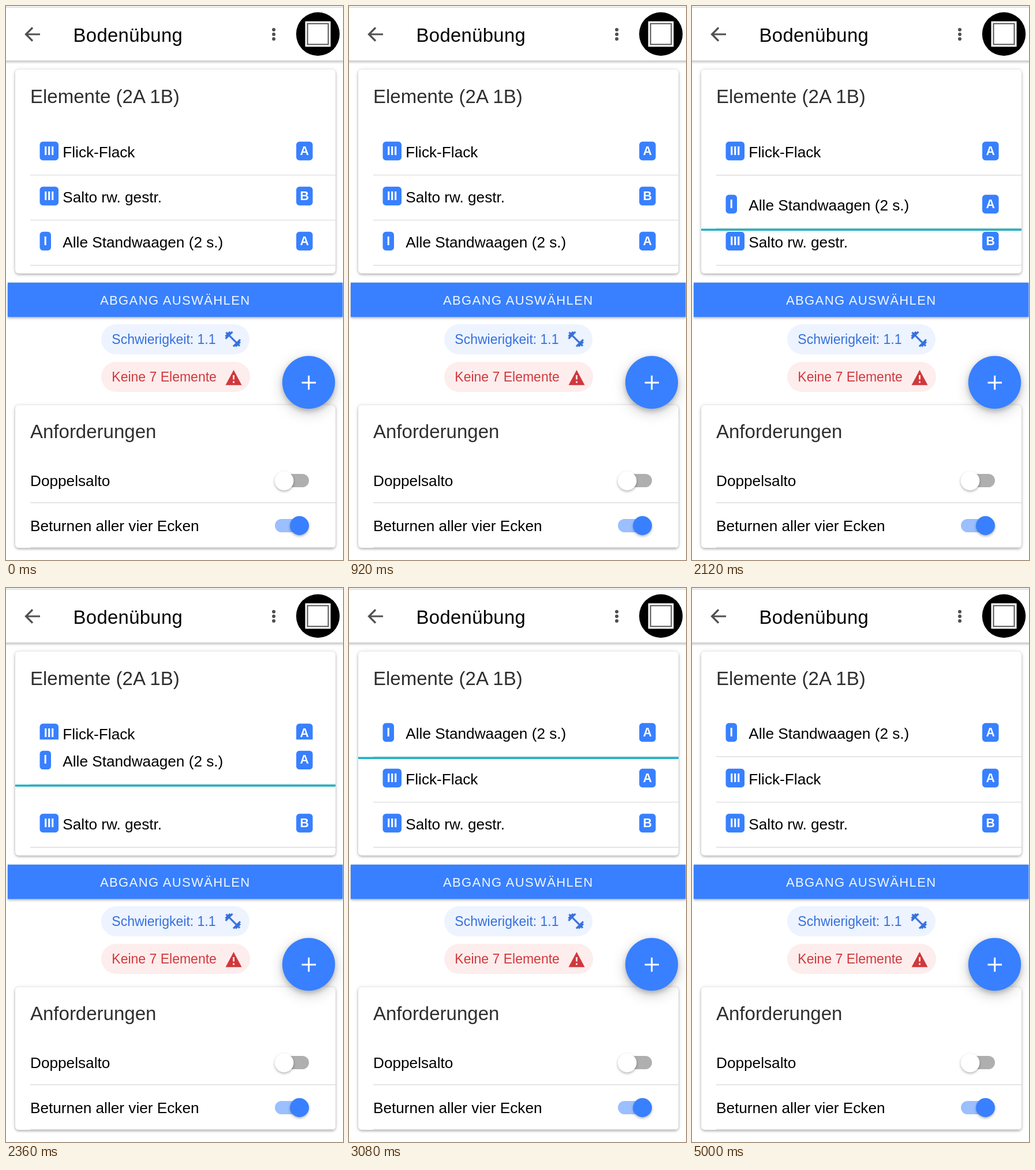
Write an HTML page that moves like this. It is 584 px wide and 959 px high and loops after 5.04 s.

```html
<!DOCTYPE html>
<html lang="de">
<head>
<meta charset="utf-8">
<title>Bodenübung</title>
<style>
  html, body { margin: 0; width: 100%; height: 100%; overflow: hidden; background: #fff; }
  svg { display: block; width: 584px; height: 959px; font: 26.2px "Liberation Sans", Arial, sans-serif; }
  .head { font-size: 33px; fill: #2e2e2e; }
  .small { font-size: 23px; }
  .badge { font-size: 21.3px; font-weight: bold; fill: #fff; text-anchor: middle; }
  .card { fill: #fff; filter: drop-shadow(0 2px 2px rgba(0,0,0,.26)) drop-shadow(0 0 3px rgba(0,0,0,.12)); }
  .lift { filter: drop-shadow(0 4px 4px rgba(0,0,0,.2)) drop-shadow(0 6px 11px rgba(0,0,0,.2)); }
  .knob { filter: drop-shadow(0 2px 2px rgba(0,0,0,.3)); }
  .line { fill: #dfdfdf; }
  .blue { fill: #3880ff; }
</style>
</head>
<body>
<svg viewBox="0 0 584 959">
  <defs>
    <linearGradient id="shade" x2="0" y2="1">
      <stop offset="0" stop-color="#bdbdbd"/>
      <stop offset=".4" stop-color="#dedede"/>
      <stop offset="1" stop-color="#fff"/>
    </linearGradient>
  </defs>

  <!-- header -->
  <rect y="1" width="584" height="2" fill="#e2e2e2"/>
  <rect y="94.5" width="584" height="6" fill="url(#shade)"/>
  <path d="M59 49H35M46 37.5L34.5 49L46 60.5" fill="none" stroke="#505050" stroke-width="3.2"/>
  <text x="116.6" y="62" font-size="32.8" letter-spacing=".35">Bodenübung</text>
  <g fill="#505050">
    <circle cx="464" cy="41" r="3"/><circle cx="464" cy="49" r="3"/><circle cx="464" cy="57" r="3"/>
  </g>
  <circle cx="540.5" cy="48.5" r="37.7"/>
  <rect x="518.5" y="26.5" width="44" height="44" fill="#fff"/>
  <rect x="522.5" y="30.5" width="36" height="36" fill="none" stroke="#555" stroke-width="2"/>

  <!-- element list -->
  <rect class="card" x="16" y="110" width="555" height="353" rx="6"/>
  <text class="head" x="42" y="168">Elemente (2A 1B)</text>
  <g id="list"></g>

  <!-- button and chips -->
  <rect class="blue knob" x="3" y="478.8" width="580.4" height="59.5"/>
  <text x="163" y="517" font-size="22" letter-spacing="1.38" fill="#f4f8ff">ABGANG AUSWÄHLEN</text>
  <rect x="165" y="551" width="257" height="52" rx="26" fill="#edf3ff"/>
  <g fill="#3570dc">
    <text class="small" x="183.3" y="585">Schwierigkeit: 1.1</text>
    <path transform="translate(377 560.5) scale(1.35)" stroke="#3570dc" stroke-width=".5" d="M20.6 14.9L22 13.4 20.6 12 17 15.6 8.4 7 12 3.4 10.6 2 9.1 3.4 7.7 2 5.6 4.1 4.1 2.7 2.7 4.1 4.1 5.6 2 7.7 3.4 9.1 2 10.6 3.4 12 7 8.4 15.6 17 12 20.6 13.4 22 14.9 20.6 16.3 22 18.4 19.9 19.9 21.3 21.3 19.9 19.9 18.4 22 16.3z"/>
  </g>
  <rect x="165" y="616" width="258" height="52" rx="26" fill="#fdeded"/>
  <g fill="#d0383c">
    <text class="small" x="183.3" y="650">Keine 7 Elemente</text>
    <path d="M380.5 656.3L394.5 630L408.5 656.3z"/>
  </g>
  <path d="M394.5 639v7.5M394.5 649.5v3" stroke="#fdeded" stroke-width="2.8"/>

  <!-- requirements -->
  <rect class="card" x="16" y="691" width="555" height="247" rx="6"/>
  <text class="head" x="42" y="748">Anforderungen</text>
  <text x="42" y="831">Doppelsalto</text>
  <rect class="line" x="42" y="859" width="529" height="1.6"/>
  <text x="42" y="909">Beturnen aller vier Ecken</text>
  <rect class="line" x="42" y="936.5" width="529" height="1.5"/>
  <rect x="466" y="810" width="59" height="23" rx="11.5" fill="#afafaf"/>
  <circle class="knob" cx="482" cy="822" r="16.4" fill="#fff"/>
  <rect x="466" y="888" width="59" height="23" rx="11.5" fill="#9bbfff"/>
  <circle class="blue knob" cx="508.5" cy="899.5" r="16.4"/>

  <!-- floating button -->
  <circle class="blue lift" cx="524.5" cy="651.5" r="45.7"/>
  <path d="M512.5 652h24.5M524.7 639.8v24.5" stroke="#fff" stroke-width="3"/>
</svg>
<script>
const LOOP = 5040, STEP = 40, PITCH = 78;
const list = document.getElementById('list');

const badge = (x, w, label) =>
  `<rect class="blue" x="${x}" y="234.8" width="${w}" height="32.4" rx="5.5"/>
   <text class="badge" x="${x + w / 2}" y="257.5">${label}</text>`;

const rows = [
  ['III', 'Flick-Flack', 'A'],
  ['III', 'Salto rw. gestr.', 'B'],
  ['I', 'Alle Standwaagen (2 s.)', 'A'],
].map(([group, name, value]) => {
  const g = document.createElementNS('http://www.w3.org/2000/svg', 'g');
  g.innerHTML =
    `<rect x="16" y="215.5" width="555" height="78" fill="#fff"/>
     <rect class="line" x="42" y="292" width="529" height="1.6"/>
     ${badge(58.5, group === 'I' ? 19.5 : 32.5, group)}
     <text x="98.3" y="262">${name}</text>
     ${badge(503, 28.5, value)}`;
  return list.appendChild(g);
});
rows[2].insertAdjacentHTML('beforeend',
  '<rect x="16" y="293.5" width="555" height="3.5" fill="#17b2c5"/>');
const marker = rows[2].lastElementChild;

// [time, offset] pairs, linear in between
const drag = [[1760, 0], [1800, -10], [1960, -43], [2120, -64], [2320, -98],
  [2560, -165], [2720, -170], [2880, -170], [3040, -157]];
const MARK_ON = 1800, MARK_OFF = 3240;

function track(keys, t) {
  const i = keys.findIndex(k => k[0] > t);
  if (i === 0) return keys[0][1];
  if (i < 0) return keys[keys.length - 1][1];
  const [t0, a] = keys[i - 1], [t1, b] = keys[i];
  return a + (b - a) * (t - t0) / (t1 - t0);
}

function slide(t, start, length) {
  const p = Math.min(1, Math.max(0, (t - start) / length));
  return PITCH * (1 - (1 - p) ** 3);
}

function draw() {
  const t = Math.floor(performance.now() % LOOP / STEP) * STEP;
  const y = [
    slide(t, 2360, 200),
    PITCH + slide(t, 1900, 200),
    2 * PITCH + track(drag, t),
  ];
  rows.forEach((row, i) => row.setAttribute('transform', `translate(0 ${y[i]})`));
  marker.setAttribute('visibility', t >= MARK_ON && t < MARK_OFF ? 'visible' : 'hidden');
  requestAnimationFrame(draw);
}
draw();
</script>
</body>
</html>
```
